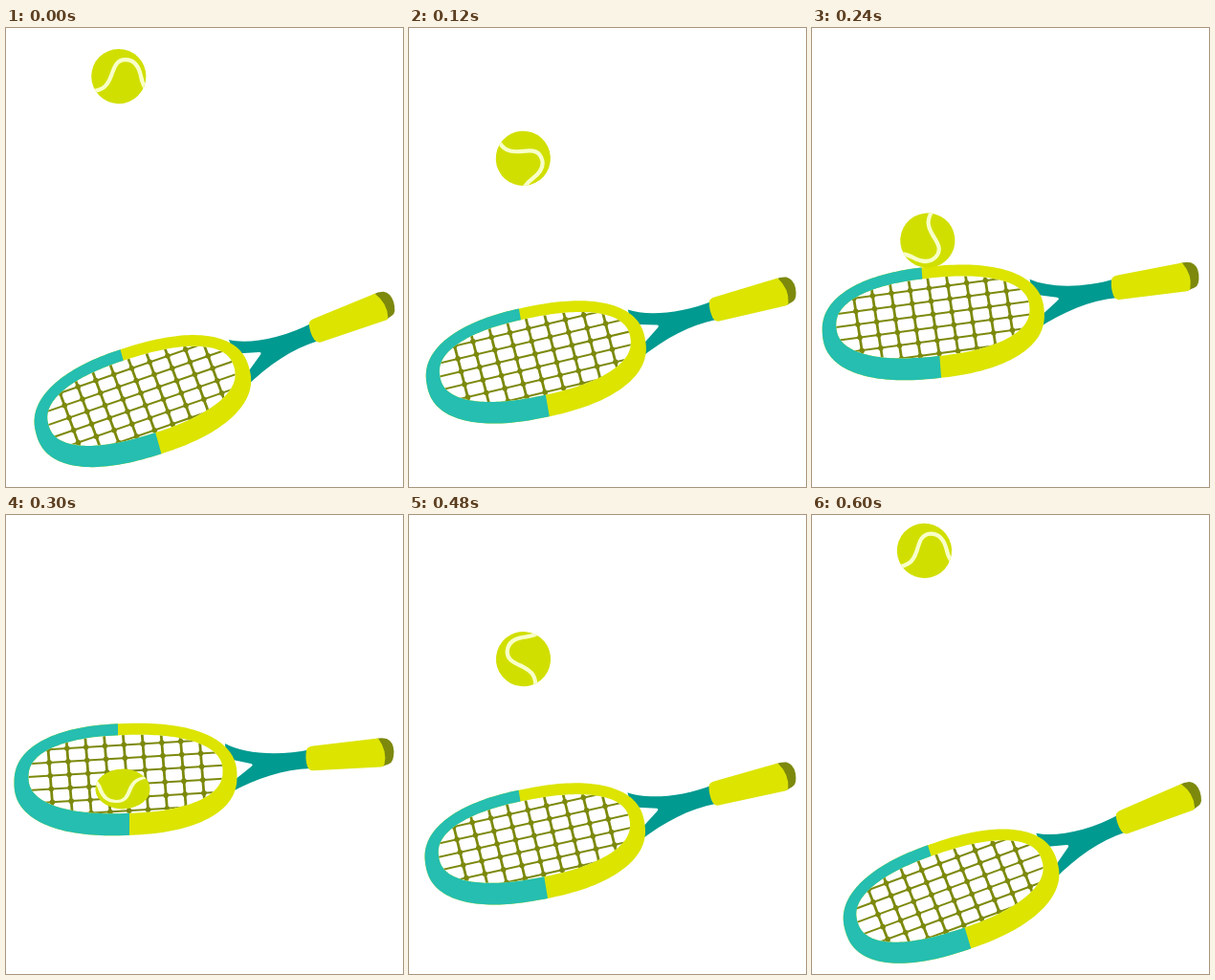
An HTML page with a canvas that plays this animation: 415x480 px, repeating every 0.66 s.

```html
<!DOCTYPE html>
<html lang="en">
<head>
<meta charset="utf-8">
<title>Tennis racket and ball</title>
<style>
  html, body { margin: 0; width: 100%; height: 100%; overflow: hidden; background: #fff; }
  canvas { display: block; }
</style>
</head>
<body>
<canvas id="stage" width="415" height="480"></canvas>
<script>
const ctx = document.getElementById('stage').getContext('2d');
const STEP = 60, STEPS = 11, HIT = 5;
const TEAL = '#25beb0', DARK = '#009a90', YELLOW = '#dce400', OLIVE = '#7c890c';
const BALL = '#d1df00', SEAM = '#f8ffc9';
const rad = deg => deg * Math.PI / 180;

// Sheared superellipse, used for both edges of the racket head
function oval(path, cx, cy, rx, ry) {
  const pow = v => Math.sign(v) * Math.abs(v) ** (2 / 2.33);
  for (let deg = 0; deg < 360; deg += 2) {
    const dx = rx * pow(Math.cos(rad(deg)));
    path.lineTo(cx + dx, cy + ry * pow(Math.sin(rad(deg))) - 0.03 * dx);
  }
  path.closePath();
  return path;
}

function headEdge(path, inside) {
  return inside ? oval(path, 124, 271, 101.5, 41) : oval(path, 124, 276.5, 116.5, 58.5);
}

const hole = headEdge(new Path2D(), true);
const ring = headEdge(new Path2D(), false);
ring.addPath(hole);
const left = new Path2D('M0 180H116V270H128V360H0Z');
const throat = new Path2D('M228 239C246 249 282 253 318 245V265C288 266 262 275 232 291Z' +
  'M236 256L255 260Q258 261 255.5 263L238 277Z');
const grip = new Path2D('M320 241.5L388 233.5Q398 247 394.5 261Q394 263.3 391 263.5L320 267.2' +
  'Q316 267.4 314 263Q311.5 255 313 246Q314 242 320 241.5Z');
const cap = new Path2D('M386 234Q391 232.6 397 234Q404 237 404.5 247Q404.5 259 399 260.5L392 263Z');
const seam = new Path2D('M-31 16C-16 15 -12 10 -8 0C-5 -8 -3 -17.5 7 -17.5C18 -17.5 22 -7 23.5 1Q25 10 31 16');

const cols = Array.from({ length: 9 }, (_, i) => 45 + i * 19.9);
const rows = Array.from({ length: 6 }, (_, i) => 240.5 + i * 13.8);
const lean = y => 0.08 * (y - 270);
const rise = x => -0.06 * (x - 122);

function line(x1, y1, x2, y2, width) {
  ctx.lineWidth = width;
  ctx.beginPath();
  ctx.moveTo(x1, y1);
  ctx.lineTo(x2, y2);
  ctx.stroke();
}

function dot(x, y, r) {
  ctx.beginPath();
  ctx.arc(x, y, r, 0, 2 * Math.PI);
  ctx.fill();
}

function fill(path, color) {
  ctx.fillStyle = color;
  ctx.fill(path, 'evenodd');
}

function drawStrings() {
  ctx.save();
  ctx.clip(hole);
  ctx.strokeStyle = ctx.fillStyle = OLIVE;
  for (const y of rows) line(15, y + rise(15), 235, y + rise(235), 2);
  for (const x of cols) {
    line(x + lean(220), 220, x + lean(320), 320, 2.8);
    for (const row of rows) {
      const y = row + rise(x);
      dot(x + lean(y), y, 2.8);
    }
  }
  ctx.restore();
}

// The head swings about a hinge far to the right of the handle.
function drawRacket(deg) {
  ctx.save();
  ctx.translate(549, 268);
  ctx.rotate(-rad(deg));
  ctx.translate(-548, -268);
  drawStrings();
  fill(throat, DARK);
  fill(cap, OLIVE);
  fill(grip, YELLOW);
  fill(ring, YELLOW);
  ctx.clip(left);
  fill(ring, TEAL);
  ctx.restore();
}

function drawBall(x, y, deg, squash) {
  ctx.save();
  ctx.translate(x, y);
  ctx.scale(1, squash);
  ctx.rotate(rad(deg));
  ctx.fillStyle = BALL;
  dot(0, 0, 28.6);
  ctx.clip();
  ctx.strokeStyle = SEAM;
  ctx.lineWidth = 4.2;
  ctx.stroke(seam);
  ctx.restore();
}

// lift counts small moves away from the hit; the way up is a little faster
function draw(now) {
  const i = Math.floor(now / STEP) % STEPS;
  const rising = i >= HIT;
  const lift = rising ? Math.floor(2.25 * (i - HIT)) : Math.ceil(2.2 * (HIT - i) - 1e-6);
  const swing = lift * (rising ? 1.527 : 1.417);
  const y = 286.5 - lift * (rising ? 22.65 : 21.45);
  const spin = 177 + lift * (rising ? 16.4 : -16.1);
  ctx.fillStyle = '#fff';
  ctx.fillRect(0, 0, 415, 480);
  drawRacket(swing);
  drawBall(122 - 0.27 * swing, y, spin, lift ? 1 : 0.73);
}

const start = performance.now();
function tick() {
  draw(performance.now() - start);
  requestAnimationFrame(tick);
}
tick();
</script>
</body>
</html>
```
